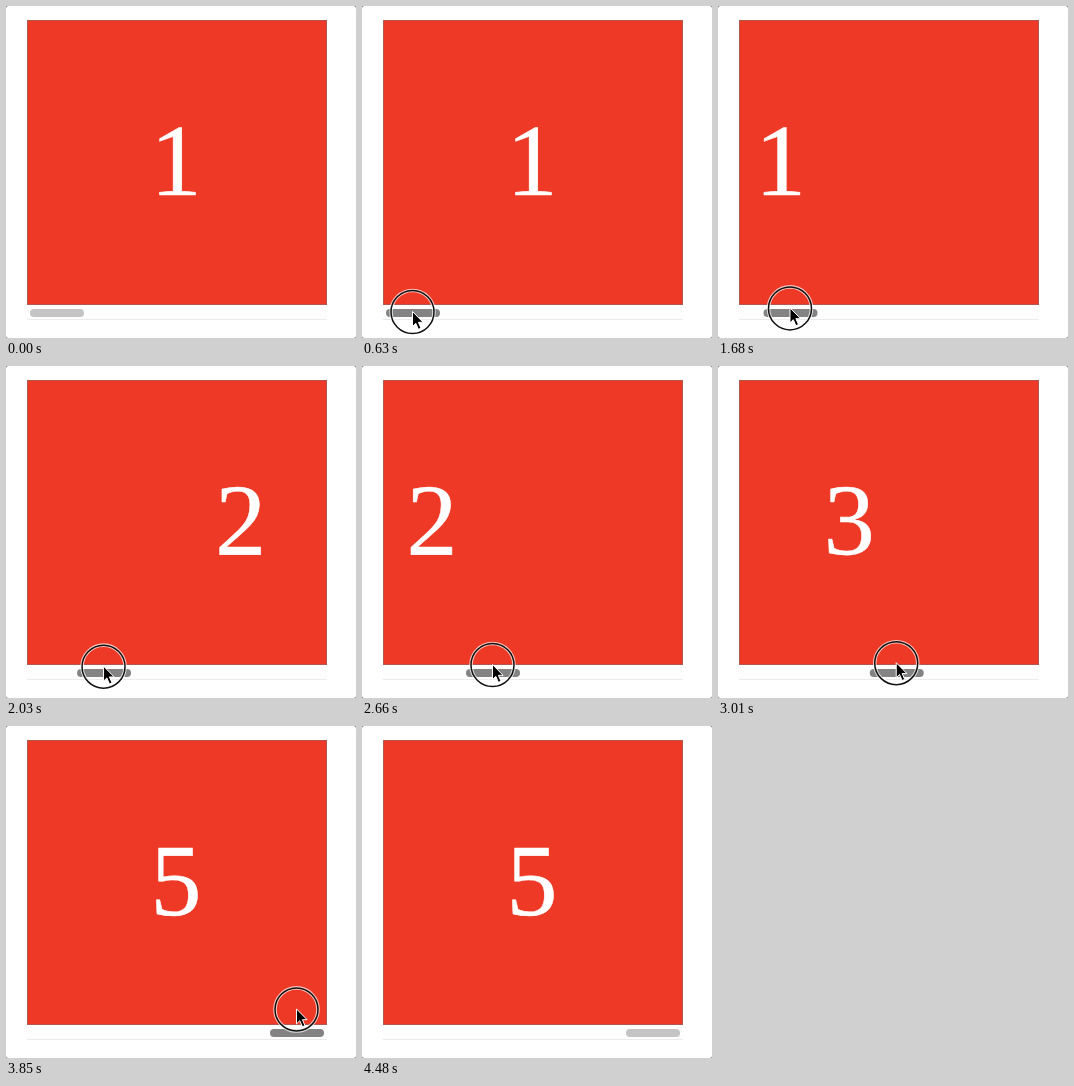
An HTML page that plays this animation: 350x332 px, repeating every 5040 ms.

```html
<!DOCTYPE html>
<html>
<head>
<meta charset="utf-8">
<style>
  html, body { margin: 0; width: 100%; height: 100%; overflow: hidden; background: #777; }
  svg { display: block; }
  text {
    font: 102px "Liberation Serif", Times, serif;
    fill: #fff; stroke: #fff; stroke-width: .6; text-anchor: middle;
  }
  circle { fill: none; }
</style>
</head>
<body>
<svg width="350" height="332" viewBox="0 0 350 332">
  <clipPath id="view"><rect x="21" y="14" width="300" height="285"/></clipPath>
  <rect width="350" height="332" rx="2.5" fill="#fff"/>
  <rect x="21.5" y="14.5" width="299" height="284" fill="#ed3926" stroke="#b2574b"/>
  <g clip-path="url(#view)"><g id="slides"></g></g>
  <rect x="21" y="299" width="300" height="14" fill="#fdfdfd"/>
  <rect x="21" y="313" width="300" height="1" fill="#ebebeb"/>
  <rect id="thumb" x="24" y="303" width="54" height="8" rx="4"/>
  <g id="cursor">
    <g id="ring">
      <circle r="21.5" stroke="#fff" stroke-width="3.6" opacity=".7"/>
      <circle r="21.5" stroke="#111" stroke-width="1.5"/>
    </g>
    <path d="M0-.5V14.5L3.3 11.3L5.9 17.3L8.5 16.2L5.9 10.3H10.6Z" fill="#000" stroke="#fff"/>
  </g>
</svg>
<script>
  const LOOP = 5040, STEP = 70, PAGE = 300, TRAVEL = 240;
  const $ = id => document.getElementById(id);

  // 0 to 1 over ms from start, with a power ease-in
  const ramp = (t, start, ms, power = 1) =>
    Math.min(1, Math.max(0, (t - start) / ms)) ** power;
  const show = (el, on) => el.setAttribute("visibility", on ? "visible" : "hidden");
  const move = (el, x, y) => el.setAttribute("transform", `translate(${x} ${y})`);

  $("slides").innerHTML = [1, 2, 3, 4, 5]
    .map((n, i) => `<text x="${170 + i * PAGE}" y="188.8">${n}</text>`).join("");

  function draw(now) {
    const t = Math.floor(now % LOOP / STEP) * STEP;

    // two drags, the second twice as long
    const offset = 80 * ramp(t, 1330, 1120, 1.13) + 160 * ramp(t, 2660, 1120, 1.04);
    move($("thumb"), offset, 0);
    $("thumb").setAttribute("fill", t >= 490 && t < 4270 ? "#838383" : "#c4c4c4");
    move($("slides"), -offset * 4 * PAGE / TRAVEL, 0);

    // the pointer follows the thumb, drifting upwards
    const away = 1 - ramp(t, 70, 490);
    const slack = ramp(t, 770, 70) - ramp(t, 1330, 70);
    const leave = ramp(t, 3850, 280);
    const x = 50.5 + 41 * away - 3.5 * slack + offset + 15 * leave;
    const y = 306 + 44 * away - 0.78 * Math.sqrt(offset) - 10.5 * ramp(t, 3430, 420) - 5 * leave;
    move($("cursor"), x, y);

    const present = t >= 70 && t < 4200;
    show($("cursor"), present);
    show($("ring"), present && t >= 630);
    requestAnimationFrame(draw);
  }
  requestAnimationFrame(draw);
</script>
</body>
</html>
```
